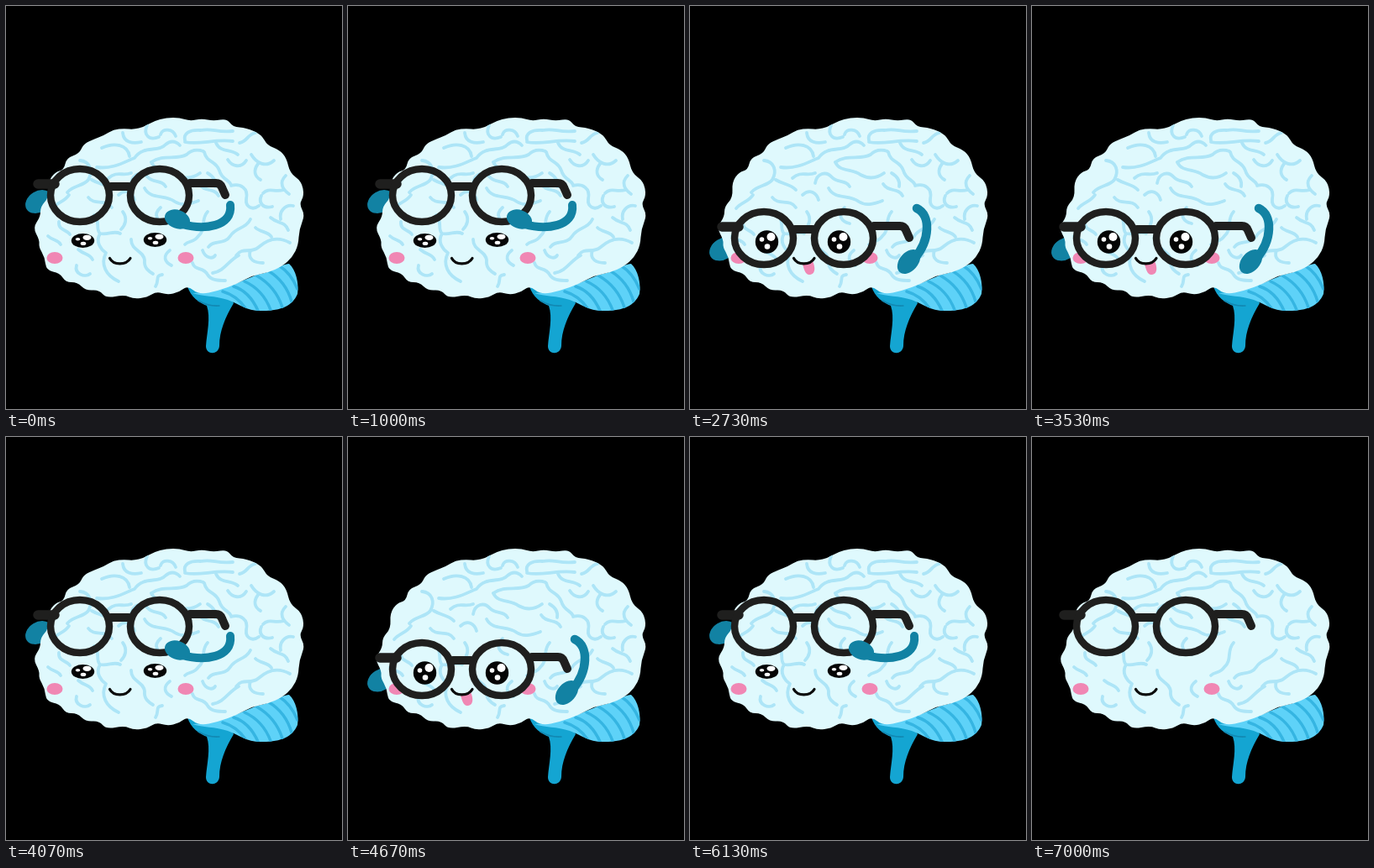
An HTML page with a canvas for the animation above (7.07 s loop, 400 by 480 pixels).

```html
<!DOCTYPE html>
<html lang="en">
<head>
<meta charset="utf-8">
<title>Brain with glasses</title>
<style>
html, body { margin: 0; width: 100%; height: 100%; overflow: hidden; background: #000; }
canvas { display: block; }
</style>
</head>
<body>
<canvas id="stage" width="400" height="480"></canvas>
<script>
const ctx = document.getElementById('stage').getContext('2d');
const LOOP = 7070;
const FRAME = 1000 / 15;
const INK = '#1f1f1e', TEAL = '#1282a3', PINK = '#f087b4';

const outline = [
  [101,160], [117,154], [128,147], [141,146], [152,147], [164,144], [176,137], [191,133],
  [207,133], [219,137], [233,134], [247,137], [263,134], [270,144], [286,145], [304,153],
  [311,166], [325,171], [334,181], [338,199], [352,209], [355,226], [349,236], [356,249],
  [349,266], [348,285], [341,299], [329,310], [311,318], [293,321], [275,331], [253,339],
  [230,344], [216,333], [206,341], [192,344], [179,340], [168,347], [152,349], [141,344],
  [119,348], [111,338], [95,339], [85,329], [71,329], [64,318], [48,315], [46,299],
  [39,287], [40,279], [32,264], [41,251], [41,239], [51,228], [50,210], [58,198],
  [69,195], [72,181], [87,176], [92,165]
];

const folds = {
  top: `M168 142C163 153 170 161 182 156 M139 151C140 163 151 164 161 162
    M184 153C186 145 199 146 202 155 M270 149C250 151 246 145 232 148C218 147 211 152 213 160
    M213 162C231 166 247 158 270 161 M114 169C129 162 145 165 147 179
    M108 192C128 195 144 184 153 181C164 165 181 175 190 165C196 160 202 161 207 166
    M173 186C187 176 203 184 215 177C221 171 229 171 235 173`,
  middle: `M173 186C178 198 193 193 203 201C214 207 224 204 231 199
    M88 184C100 185 104 196 98 207C92 215 80 213 73 222 M102 207C112 213 120 212 126 219
    M122 205C132 196 139 203 149 199 M149 211C151 199 162 196 169 204C175 211 186 207 190 215
    M165 217C172 231 190 224 201 233C210 239 221 235 229 232
    M134 225C143 217 151 223 153 231 M75 225C70 233 61 234 55 241
    M98 228C105 238 119 229 126 240`,
  right: `M236 174C239 187 250 184 254 196C257 207 265 206 268 213 M250 163C255 175 268 170 276 177
    M297 151C287 153 287 162 278 163 M264 183C269 191 280 194 286 184
    M292 177C298 187 309 193 319 184 M300 188C294 196 296 203 303 207
    M333 202C324 211 330 219 337 224 M331 219C319 222 313 216 306 223
    M268 214C279 211 289 217 286 230C285 239 293 244 301 238 M304 226C300 234 306 242 317 239
    M342 238C332 236 325 245 327 254 M315 252C324 260 332 256 336 267
    M230 212C236 222 248 216 253 226 M240 199C247 203 250 209 249 215`,
  lower: `M291 254C285 266 274 263 267 274C260 285 247 278 241 287
    M240 245C231 255 239 265 229 274C224 282 218 279 213 284
    M338 282C322 273 310 279 301 287C291 296 282 286 274 297
    M291 291C287 302 296 306 306 306 M277 297C265 303 260 316 246 318
    M222 306C225 316 235 310 240 320C244 327 254 327 261 327
    M297 264C303 270 312 268 316 275 M234 291C237 300 246 302 249 297`,
  face: `M105 249C113 258 106 265 112 271C122 273 128 267 136 271
    M112 271C106 281 113 290 119 294C112 308 119 321 134 328
    M149 278C149 292 164 291 165 303C164 312 170 316 175 319
    M84 309C81 319 94 324 100 319 M178 334C183 326 177 321 186 320
    M195 291C186 298 189 305 197 309 M63 257C62 268 73 266 76 272
    M184 240C174 249 181 257 190 259 M139 245C145 253 142 261 137 266
    M50 274C56 280 62 278 65 284 M86 290C94 297 99 294 103 302`
};
const foldPaths = Object.values(folds).map(d => new Path2D(d));
const stem = new Path2D('M216 334C220 347 230 353 239 357C244 371 239 390 238 405C238 416 253 416 254 405C254 387 261 371 271 354L262 338Z');
const cerebellum = new Path2D('M222 342C250 341 278 329 299 320C318 317 326 308 337 307C345 314 349 330 347 343C341 357 328 363 306 363C287 364 278 355 264 350C249 345 234 346 222 342Z');
const stripes = new Path2D(`M258 340Q275 345 285 360 M271 334Q290 340 300 363
  M284 328Q306 338 315 362 M298 321Q321 334 329 359 M313 316Q333 328 340 352 M326 310Q339 318 347 337`);
const brain = smooth(outline);

// Closed curve through the midpoints of neighbouring points.
function smooth(points) {
  const path = new Path2D();
  const mid = (a, b) => [(a[0] + b[0]) / 2, (a[1] + b[1]) / 2];
  path.moveTo(...mid(points[points.length - 1], points[0]));
  points.forEach((p, i) => path.quadraticCurveTo(...p, ...mid(p, points[(i + 1) % points.length])));
  path.closePath();
  return path;
}

function fill(path, color) {
  ctx.fillStyle = color;
  ctx.fill(path);
}

function stroke(path, color, width) {
  ctx.strokeStyle = color;
  ctx.lineWidth = width;
  ctx.stroke(typeof path === 'string' ? new Path2D(path) : path);
}

function ellipse(x, y, rx, ry, color, angle = 0) {
  ctx.beginPath();
  ctx.ellipse(x, y, rx, ry, angle, 0, Math.PI * 2);
  ctx.fillStyle = color;
  ctx.fill();
}

function drawBody() {
  fill(stem, '#14a5d2');
  stroke('M229 351Q241 358 254 357', '#1288b2', 1.5);
  fill(cerebellum, '#5ed2f8');
  ctx.save();
  ctx.clip(cerebellum);
  stroke(stripes, '#35b5e2', 3.5);
  ctx.restore();
  fill(brain, '#dff9fd');
  ctx.save();
  ctx.clip(brain);
  foldPaths.forEach(path => stroke(path, '#ade5f7', 3.8));
  ctx.restore();
}

function drawEye(x, y, squint) {
  ctx.save();
  ctx.translate(x, y);
  ctx.scale(1, squint ? 0.62 : 1);
  ellipse(0, 0, 13.7, 13.7, '#050505');
  ellipse(5, -6, 5, 5, '#fff');
  ellipse(-6, -3, 2.8, 2.8, '#fff');
  ellipse(0.5, 5.5, 3.3, 3.3, '#fff');
  ctx.restore();
}

function drawFace(raised, showEyes) {
  ellipse(58, 300, 9.5, 7, PINK);
  ellipse(214, 300, 9.5, 7, PINK);
  if (showEyes) {
    drawEye(91.5, raised ? 279.5 : 281, raised);
    drawEye(177.5, raised ? 278.5 : 281, raised);
  }
  if (!raised) fill(new Path2D('M134 308Q141 308 146 304C149 310 150 319 143 320C137 321 136 313 134 308Z'), PINK);
  stroke('M123.5 300.5C128 309 143 309 148 300.5', '#0b0b0b', 3.2);
}

function drawGlasses(dy) {
  ctx.save();
  ctx.translate(0, dy);
  stroke('M38 212H58', INK, 11.5);
  stroke('M125 215H146', INK, 10);
  stroke('M219 211H250Q255 211 257 216L261 225', INK, 10);
  for (const x of [88, 183]) {
    ctx.beginPath();
    ctx.ellipse(x, 225.5, 35, 31.5, 0, 0, Math.PI * 2);
    ctx.strokeStyle = INK;
    ctx.lineWidth = 8.5;
    ctx.stroke();
  }
  ctx.restore();
}

function drawArm(raised) {
  if (raised) {
    stroke('M267 237C270 263 236 267 210 260', TEAL, 10);
    ellipse(204, 254, 15.5, 11, TEAL, 0.35);
  } else {
    stroke('M270 241C287 249 286 279 267 301', TEAL, 10.5);
    ellipse(260.5, 304.5, 16.5, 11, TEAL, -0.85);
  }
}

function draw(time) {
  const frame = Math.floor((time + 4) / FRAME);
  // The last frame is the raised pose with eyes and arms missing.
  const blank = frame >= 105;
  const raised = frame % 15 < 8;
  ctx.fillStyle = '#000';
  ctx.fillRect(0, 0, 400, 480);
  if (!blank) ellipse(39, raised ? 233 : 289.5, 17, 12.5, TEAL, -0.55);
  drawBody();
  drawFace(raised, !blank);
  drawGlasses(raised ? 0 : 51);
  if (!blank) drawArm(raised);
}

ctx.lineCap = ctx.lineJoin = 'round';
const start = performance.now();
function tick() {
  draw((performance.now() - start) % LOOP);
  requestAnimationFrame(tick);
}
tick();
</script>
</body>
</html>
```
